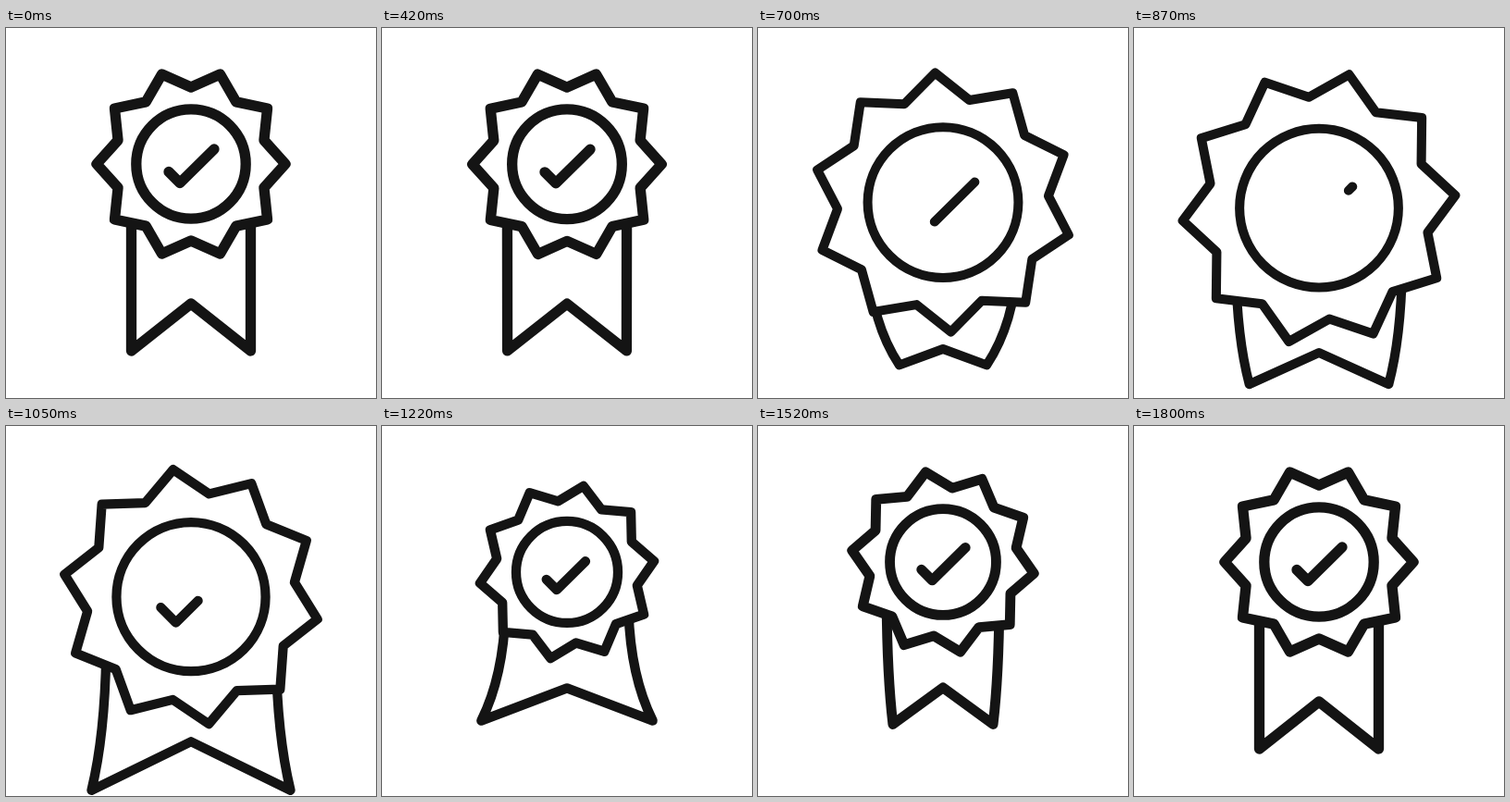
An HTML page with a canvas for the animation above (1.82 s loop, 400 by 400 pixels).

```html
<!DOCTYPE html>
<html lang="en">
<head>
<meta charset="utf-8">
<title>Award badge</title>
<style>
  html, body { margin: 0; width: 100%; height: 100%; overflow: hidden; background: #fff; }
  canvas { display: block; width: 400px; height: 400px; }
</style>
</head>
<body>
<canvas id="stage" width="400" height="400"></canvas>
<script>
const ctx = document.getElementById('stage').getContext('2d');
const LOOP = 1820;
const START = 410;
const SWAP = 885;
const END = 1800;
const CX = 200;
const INK = '#141414';

const clamp = u => Math.min(1, Math.max(0, u));
const mix = (a, b, u) => a + (b - a) * u;

// Cubic Bézier ease with flat ends; easeOut and easeIn are the handle positions in time.
function ease(u, easeOut = 1 / 3, easeIn = 2 / 3) {
  let low = 0, high = 1;
  for (let i = 0; i < 20; i++) {
    const s = (low + high) / 2, r = 1 - s;
    const x = 3 * r * r * s * easeOut + 3 * r * s * s * easeIn + s ** 3;
    if (x < u) low = s; else high = s;
  }
  return low * low * (3 - 2 * low);
}

// Rests at value, then eases through each stop: [time, value, easeOut, easeIn].
function track(value, ...stops) {
  return time => {
    let t0 = START, v0 = value;
    for (const [t1, v1, easeOut, easeIn] of stops) {
      if (time < t1) return mix(v0, v1, ease(clamp((time - t0) / (t1 - t0)), easeOut, easeIn));
      [t0, v0] = [t1, v1];
    }
    return v0;
  };
}

const motion = {
  turn: track(0, [END, -108, 0.2, 0.56]),
  scale: track(1, [930, 1.455, 0.17, 0.32], [1270, 0.91, 0.6, 0.52], [END, 1, 0.2, 0.42]),
  centerY: track(147, [930, 195, 0.17, 0.2], [1400, 147, 0.3, 0.52]),
  line: track(11.3, [700, 10], [1220, 10.3], [END, 11.3]),
  tailWidth: track(64.5, [690, 47], [1070, 108], [1500, 54], [END, 64.5]),
  tailY: track(349, [480, 348], [1035, 395], [1260, 312], [1370, 312], [END, 349]),
  notchY: track(298, [760, 351], [990, 351], [1250, 281], [1450, 281], [END, 298])
};

function drawRibbon({ scale, centerY, tailWidth, tailY, notchY }) {
  const root = 64.5 * scale;
  const top = centerY + 45 * scale;
  const topWidth = mix(root, tailWidth, 0.2);
  const bendWidth = mix(root, tailWidth, 0.27);
  const bendY = mix(top, tailY, 0.6);
  ctx.beginPath();
  ctx.moveTo(CX - topWidth, top);
  ctx.quadraticCurveTo(CX - bendWidth, bendY, CX - tailWidth, tailY);
  ctx.lineTo(CX, notchY);
  ctx.lineTo(CX + tailWidth, tailY);
  ctx.quadraticCurveTo(CX + bendWidth, bendY, CX + topWidth, top);
  ctx.stroke();
}

function drawSeal({ scale, centerY, turn }) {
  ctx.beginPath();
  for (let i = 0; i < 20; i++) {
    const radius = (i % 2 ? 83 : 102) * scale;
    const angle = (turn + i * 18) * Math.PI / 180;
    ctx.lineTo(CX + radius * Math.cos(angle), centerY + radius * Math.sin(angle));
  }
  ctx.closePath();
  ctx.fill();
  ctx.stroke();

  ctx.beginPath();
  ctx.arc(CX, centerY, 59.2 * scale, 0, Math.PI * 2);
  ctx.stroke();
}

function drawCheck({ scale, centerY }, from, to) {
  if (to - from < 0.005) return;
  const elbow = 0.25;
  const lineTo = u => {
    const short = Math.min(u / elbow, 1);
    const long = Math.max((u - elbow) / (1 - elbow), 0);
    const x = -24 + 12 * short + 37 * long;
    const y = 8.5 + 12 * short - 36.5 * long;
    ctx.lineTo(CX + x * scale, centerY + y * scale);
  };
  ctx.beginPath();
  lineTo(from);
  if (from < elbow && to > elbow) lineTo(elbow);
  lineTo(to);
  ctx.stroke();
}

function draw(time) {
  const pose = {};
  for (const name in motion) pose[name] = motion[name](time);

  ctx.fillStyle = '#fff';
  ctx.fillRect(0, 0, 400, 400);
  ctx.strokeStyle = INK;
  ctx.lineWidth = pose.line;
  ctx.lineCap = ctx.lineJoin = 'round';

  drawRibbon(pose);
  drawSeal(pose);

  // The tick wipes away from its short arm, then is written again.
  const wiped = clamp((time - START) / (SWAP - START)) ** 2.1;
  const written = 1 - (1 - clamp((time - SWAP) / 480)) ** 2.2;
  if (time < SWAP) drawCheck(pose, wiped, 1);
  else drawCheck(pose, 0, written);
}

function frame() {
  draw(performance.now() % LOOP);
  requestAnimationFrame(frame);
}
frame();
</script>
</body>
</html>
```
